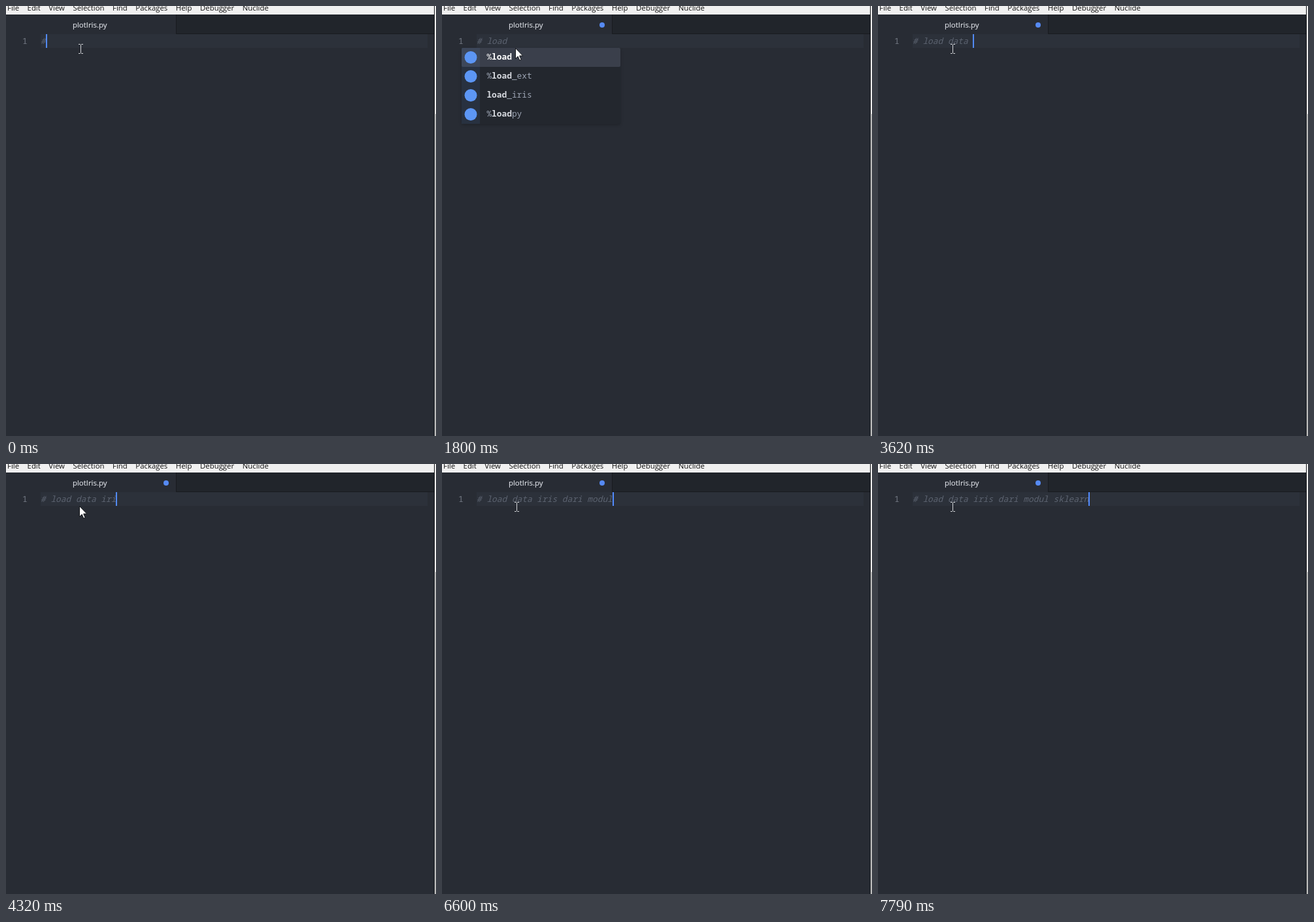
Recreate the animation shown at these times as an HTML page. Size 658x657 px, loop 8000 ms.

```html
<!DOCTYPE html>
<html lang="en">
<head>
<meta charset="utf-8">
<title>Editor typing</title>
<style>
  html, body { margin: 0; width: 100%; height: 100%; overflow: hidden; background: #282c34; }
  svg { display: block; width: 658px; height: 657px; }
  text { white-space: pre; }
  .ui { font-family: "Open Sans", "Noto Sans", sans-serif; font-size: 11.4px; }
  .code { font-family: "Noto Sans Mono", "Liberation Mono", monospace; font-size: 12.833px; }
  .title { fill: #d7dae0; stroke: #d7dae0; stroke-width: .2; }
  .comment { fill: #5c6370; font-style: italic; }
  .row { fill: #9da5b4; }
  .row tspan { fill: #d7dae0; font-weight: bold; }
  .row.selected, .row.selected tspan { fill: #fff; }
  .popup { filter: drop-shadow(0 2px 2px rgba(0, 0, 0, .2)); }
</style>
</head>
<body>
<svg viewBox="0 0 658 657">
  <rect width="658" height="657" fill="#282c34"/>
  <rect x="260" y="13" width="395" height="30" fill="#21252b"/>
  <path d="M260.5 13V42.5H655" fill="none" stroke="#181a1f"/>
  <rect width="655" height="13" fill="#f0f0f0"/>
  <text id="menu" class="ui" x="2" y="7" fill="#111"></text>
  <text class="ui title" x="102" y="33">plotIris.py</text>
  <circle id="modified" cx="245" cy="29" r="4" fill="#568af2"/>

  <rect x="53" y="43" width="592" height="21" fill="#2c313a"/>
  <text class="code" x="25" y="58" fill="#737984">1</text>
  <text id="line" class="code comment" x="53" y="58"></text>
  <rect id="caret" y="43" width="2" height="21" fill="#528bff"/>
  <g id="popup" class="popup"></g>

  <path id="beam" d="M111 58.5h2.5l1 1 1-1h2.500M114.500 59.500v12M111 72.500h2.500l1-1 1 1h2.500" fill="none" stroke="#d4d6d9"/>
  <path id="arrow" d="M112.500 64.500v16l3.700-3.500 2.600 6 2.400-1-2.600-5.900h5z" fill="#fff" stroke="#16181c"/>

  <rect x="655" width="1" height="657" fill="#181a1f"/>
  <rect x="656" width="1" height="657" fill="#e4e4e2"/>
  <rect x="657" width="1" height="165" fill="#f4f4f4"/>
  <rect x="657" y="165" width="1" height="492" fill="#a0a0a0"/>
</svg>
<script>
const LOOP = 8000;
const LEFT = 53;
const ADVANCE = 7.7;
const ROW = 29;
const BLINK_DELAY = 270;
const BLINK = 430;
const POINTER_X = 114;
const POINTER_LAG = 100;
const $ = id => document.getElementById(id);

$("menu").innerHTML = "File Edit View Selection Find Packages Help Debugger Nuclide".split(" ")
  .map((label, i) => `<tspan dx="${i ? 12.5 : 0}">${label}</tspan>`).join("");

const KERNEL_WORDS = ["%load", "%load_ext", "load_iris", "%loadpy", "id", "input", "int", "isinstance"];
const BUFFER_WORDS = ["is", "set"];

// Bursts of typing: text, time of the first key, time of the last key.
const BURSTS = [
  ["#", 0], [" ", 270], ["load", 1110, 1530], [" data", 2080, 2490], [" ", 2910],
  ["i", 4190], ["ri", 4320], ["s ", 4590, 4720], ["da", 4860], ["ri", 5130, 5250],
  [" ", 5800], ["modul", 6080, 6600], [" s", 6870], ["k", 7000], ["lea", 7270, 7520], ["rn", 7790]
];
const KEYS = BURSTS.flatMap(([text, first, last = first]) =>
  [...text].map((char, i) => ({ char, time: first + (last - first) * i / (text.length - 1 || 1) })));

const keysUntil = time => KEYS.filter(key => key.time <= time + 0.01);

function suggest(keys) {
  const line = keys.map(key => key.char).join("");
  const word = line.match(/[a-z]*$/)[0];
  const matches = list => word ? list.filter(item => item.replace("%", "").startsWith(word)) : [];
  const kernel = matches(KERNEL_WORDS);
  const items = [...kernel, ...matches(BUFFER_WORDS)];
  if (!items.length) return null;
  const textX = LEFT + ADVANCE * (line.length - word.length);
  const x = Math.round(textX - (kernel.length ? 38 : ADVANCE));
  const width = kernel.length && word.length < 3 ? 273 : 243;
  return { x, textX, width, word, items, icons: kernel.length };
}

function popupMarkup({ x, textX, width, word, items, icons }) {
  const rows = items.map((item, i) => {
    const y = 64 + i * ROW;
    const label = item.replace(word, "<tspan>$&</tspan>");
    const icon = i < icons
      ? `<rect x="${x}" y="${y}" width="28" height="${ROW}" fill="#5c96f5" fill-opacity=".09"/>
         <circle cx="${x + 14}" cy="${y + 14.5}" r="9.5" fill="#5c96f5"/>` : "";
    return `${icon}<text class="code row ${i ? "" : "selected"}" x="${textX}" y="${y + 18}">${label}</text>`;
  });
  return `<rect x="${x}" y="64" width="${width}" height="${items.length * ROW}" rx="3" fill="#23272e"/>
    <rect x="${x}" y="64" width="${width}" height="${ROW}" rx="2" fill="#3a3f4b"/>${rows.join("")}`;
}

// The caret is steady after a key, then blinks, starting with the dark half.
function caretVisible(idle) {
  return idle < BLINK_DELAY || Math.floor((idle - BLINK_DELAY) / BLINK) % 2 === 1;
}

const show = (id, visible) => $(id).setAttribute("visibility", visible ? "visible" : "hidden");

function render(time) {
  const keys = keysUntil(time);
  const popup = suggest(keys);
  const underPointer = popup || suggest(keysUntil(time - POINTER_LAG));
  const arrow = underPointer !== null && underPointer.x < POINTER_X;

  $("line").textContent = keys.map(key => key.char).join("");
  $("caret").setAttribute("x", Math.round(LEFT - 0.1 + keys.length * ADVANCE));
  $("popup").innerHTML = popup ? popupMarkup(popup) : "";
  show("caret", caretVisible(time - keys.at(-1).time));
  show("modified", keys.length > 1);
  show("arrow", arrow);
  show("beam", !arrow);
}

const begin = performance.now();
function tick() {
  render((performance.now() - begin) % LOOP);
  requestAnimationFrame(tick);
}
tick();
</script>
</body>
</html>
```
